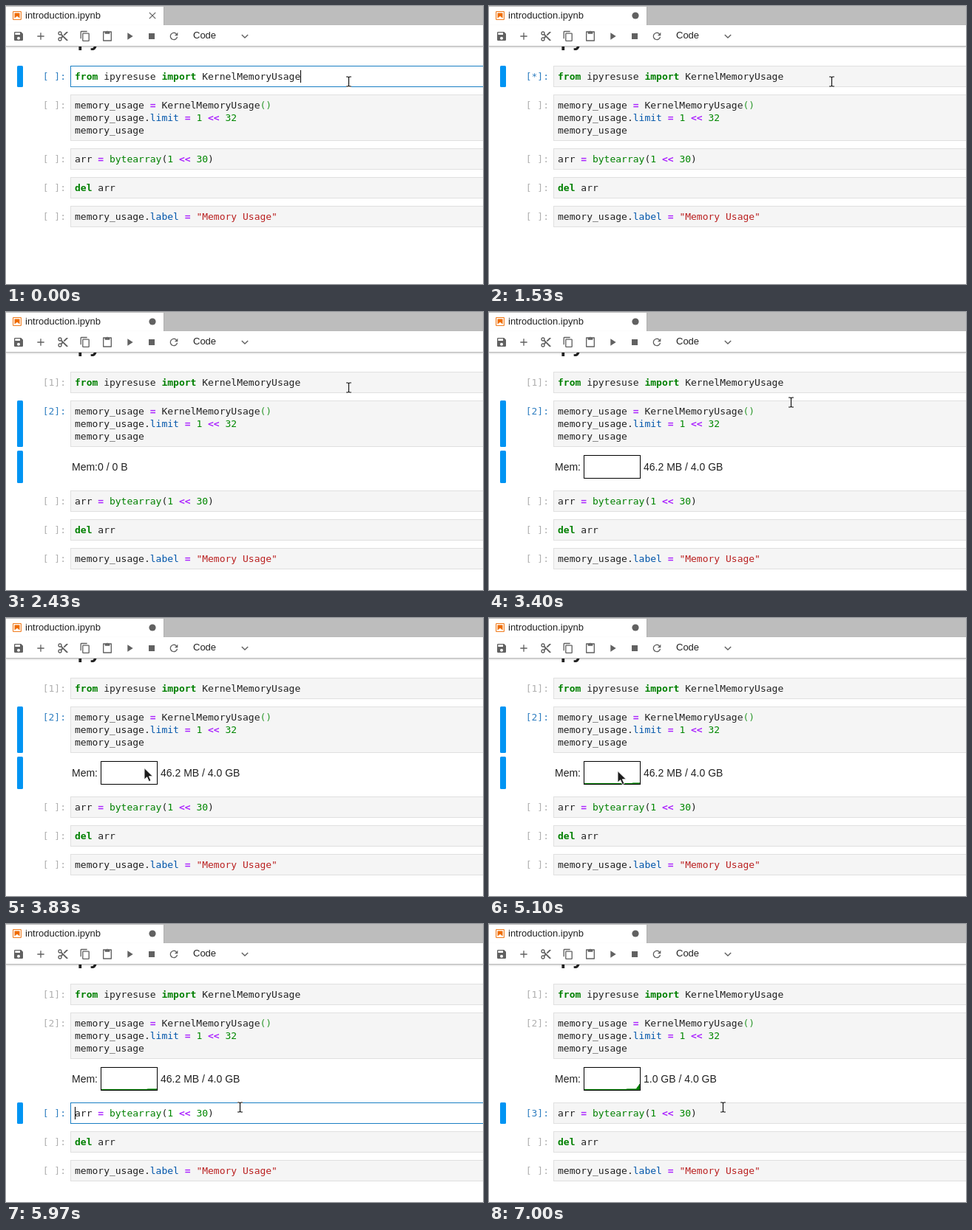
Write an HTML page that moves like this. It is 645 px wide and 377 px high and loops after 8000 ms.

```html
<!DOCTYPE html>
<html lang="en">
<head>
<meta charset="utf-8">
<title>Notebook memory usage</title>
<style>
  html, body { margin: 0; width: 100%; height: 100%; overflow: hidden; background: #fff; }
  #stage { position: relative; width: 645px; height: 377px; overflow: hidden; background: #fff; }
  #stage div, #stage svg { position: absolute; box-sizing: border-box; white-space: pre; }
  .ui { font: 13px/17px "Liberation Sans", Arial, sans-serif; color: #212121; }
  .out { font: 14px/20px "Liberation Sans", Arial, sans-serif; color: #212121; top: 12px; }
  .code, .prompt { font: 13px/17px "DejaVu Sans Mono", monospace; }
  #tabbar { left: 0; top: 0; width: 645px; height: 26px; background: #bdbdbd; }
  #tab { left: 0; top: 1px; width: 214px; height: 25px; background: #fff; border-right: 1px solid #b0b0b0; }
  #toolbar { left: 0; top: 26px; width: 645px; height: 29px; background: #fff;
    border-bottom: 1px solid #bdbdbd; box-shadow: 0 1px 2px rgba(0, 0, 0, .2); }
  #heading { left: 89px; top: 29px; font: bold 27.3px/31px "Liberation Sans", Arial, sans-serif; color: #212121; }
  .cell { left: 0; width: 700px; }
  .bar { left: 15px; top: 0; width: 8px; height: 100%; background: #0094f3; border-radius: 1.5px; }
  .prompt { left: 49.7px; top: 6px; color: #b0b0b0; }
  .active > .prompt { color: #307fc1; }
  .code { left: 87px; top: 0; width: 600px; height: 100%; padding: 5px; color: #212121;
    background: #f5f5f5; border: 1px solid #e0e0e0; }
  .edit > .code { background: #fff; border-color: #1a7fc4; }
  .caret { top: 6px; width: 1px; height: 17px; background: #000; }
  .code b { color: #008000; }
  .code i { font-style: normal; }
  .code .op { color: #aa22ff; font-weight: bold; }
  .code .num { color: #008800; }
  .code .fn { color: #008000; }
  .code .prop { color: #0055aa; }
  .code .str { color: #ba2121; }
  .code .match { color: #2f9a2f; }
  #output { left: 0; top: 188px; width: 645px; height: 44px; }
  #plot { left: 128px; top: 6px; width: 77px; height: 32px; border: 1px solid #000; background: #fff; }
  #plot svg { left: 0; top: 0; }
  #art, #mouse { left: 0; top: 0; }
</style>
</head>
<body>
<div id="stage">
  <div id="heading">ipyresuse</div>
  <div id="tabbar"></div>
  <div id="tab"></div>
  <div id="toolbar"></div>
  <div class="ui" style="left:26px;top:4px">introduction.ipynb</div>
  <div class="ui" style="left:253px;top:31px">Code</div>
  <svg id="art" width="645" height="60" fill="#616161">
    <g transform="translate(8 6) scale(.636)" fill="#ef6c00">
      <path d="M2.5 2.5h17v17h-17z" fill="none" stroke="#ef6c00" stroke-width="1.5"/>
      <path d="M16.5 16.5l-5.4-4.3-5.6 4.3v-11h11z"/>
    </g>
    <path id="close" d="M193.8 8.8l8.4 8.4m0-8.4l-8.4 8.4" stroke="#616161" stroke-width="1.2"/>
    <circle id="dirty" cx="198" cy="13" r="4.6"/>
    <path d="M318.8 39l4.2 4 4.2-4" fill="none" stroke="#616161" stroke-width="1.4"/>
  </svg>
  <div id="output">
    <div class="bar" id="outBar"></div>
    <div class="out" id="label" style="left:89px"></div>
    <div id="plot"><svg width="75" height="30"><path id="line" fill="#008000" stroke="#008000" stroke-width="1"/></svg></div>
    <div class="out" id="value" style="left:209px"></div>
  </div>
  <svg id="mouse" width="645" height="377">
    <g id="beam" fill="none">
      <path d="M-3.5-6.5h2.5l1 1 1-1h2.5M0-5.5v11M-3.5 6.5h2.5l1-1 1 1h2.5" stroke="#fff" stroke-width="2.6"/>
      <path d="M-3.5-6.5h2.5l1 1 1-1h2.5M0-5.5v11M-3.5 6.5h2.5l1-1 1 1h2.5" stroke="#111" stroke-width="1.2"/>
    </g>
    <path id="arrow" d="M0-.5v15.6l3.7-3.4 2.6 6 2.7-1.2-2.6-5.7h5.1z"
      fill="#1c1c1c" stroke="#fff" stroke-width=".9"/>
  </svg>
</div>
<script>
const LOOP = 8000;
const $ = id => document.getElementById(id);
const show = (el, on) => { el.style.display = on ? "" : "none"; };

// Toolbar icons on a 24 unit grid, 30 px apart
const ICONS = [
  '<path fill-rule="evenodd" d="M17 3H5a2 2 0 0 0-2 2v14a2 2 0 0 0 2 2h14a2 2 0 0 0 2-2V7zM12 19a3 3 0 0 1 0-6 3 3 0 0 1 0 6zM15 9H5V5h10z"/>',
  '<path d="M19 13h-6v6h-2v-6H5v-2h6V5h2v6h6z"/>',
  '<g fill="none" stroke="#616161" stroke-width="2"><circle cx="6" cy="6" r="3"/><circle cx="6" cy="18" r="3"/></g>' +
    '<path d="M9.6 7.6L22 20v1h-3l-7-7-2.4 2.4-2-2L10 12 7.6 9.6zM19 3l-6 6 2 2 7-7V3z"/>',
  '<path d="M3.3 17V3.5q0-1.2 1.2-1.2H16" fill="none" stroke="#616161" stroke-width="2"/>' +
    '<rect x="7.2" y="6.2" width="12.6" height="15.4" rx="1" fill="none" stroke="#616161" stroke-width="2"/>',
  '<path d="M4 3h16v18H4z" fill="none" stroke="#616161" stroke-width="2" stroke-linejoin="round"/>' +
    '<path fill-rule="evenodd" d="M7 7V3h2.2a3 3 0 0 1 5.6 0H17v4zM12 2a1 1 0 0 0 0 2 1 1 0 0 0 0-2z"/>',
  '<path d="M8 5v14l11-7z"/>',
  '<path d="M6 6h12v12H6z"/>',
  '<path d="M18.8 13.3A7 7 0 1 1 17 7.1" fill="none" stroke="#616161" stroke-width="2"/><path d="M20 4v6.7h-6.7z"/>'
];
$("art").insertAdjacentHTML("beforeend", ICONS.map((icon, i) =>
  `<g transform="translate(${9 + 30 * i} 33) scale(.6667)">${icon}</g>`).join(""));

const tag = (cls, text) => `<i class="${cls}">${text}</i>`;
const eq = tag("op", "=");
const shift = n => `${tag("num", 1)} ${tag("op", "&lt;&lt;")} ${tag("num", n)}`;
const SOURCES = [
  "<b>from</b> ipyresuse <b>import</b> KernelMemoryUsage",
  `memory_usage ${eq} KernelMemoryUsage${tag("match", "()")}\nmemory_usage.${tag("prop", "limit")} ${eq} ${shift(32)}\nmemory_usage`,
  `arr ${eq} ${tag("fn", "bytearray")}(${shift(30)})`,
  "<b>del</b> arr",
  `memory_usage.${tag("prop", "label")} ${eq} ${tag("str", '"Memory Usage"')}`
];
const CARET_X = [398, 93, 93, 93, 93];
const cells = SOURCES.map((html, i) => {
  const el = document.createElement("div");
  const height = 12 + 17 * html.split("\n").length;
  el.style.height = height + "px";
  el.innerHTML = `<div class="bar"></div><div class="prompt"></div><div class="code">${html}</div>` +
    `<div class="caret" style="left:${CARET_X[i]}px"></div>`;
  $("stage").insertBefore(el, $("output"));
  const [bar, prompt, , caret] = el.children;
  return { el, bar, prompt, caret, height };
});

// Latest entry of a [time, value] table
const at = (steps, t) => steps.reduce((v, s) => (t >= s[0] ? s[1] : v), steps[0][1]);

const SELECTED = [[0, 0], [2070, 1], [5965, 2]];
const EDITING = [[0, 0], [1530, -1], [5965, 2], [6400, -1]];
const CARET = [[0, true], [430, false], [1000, true]];
const COUNTS = [
  [[0, " "], [1530, "*"], [1570, "1"]],
  [[0, " "], [2370, "*"], [2430, "2"]],
  [[0, " "], [6400, "*"], [6970, "3"]],
  [[0, " "]],
  [[0, " "]]
];
// Where the raised part of the graph begins
const RAISED = [[0, 75], [4430, 64], [5700, 61], [7000, 56]];

const easeOut = p => 1 - (1 - p) ** 3;
const easeBoth = p => p * p * (3 - 2 * p);
const MOVES = [
  { from: 3367, to: 3567, x: 242, y: 184, ease: p => p * (1.6 - .6 * p) },
  { from: 3733, to: 3967, x: 174, y: 208, ease: easeOut },
  { from: 5367, to: 5933, x: 316, y: 249, ease: easeBoth }
];

function mouseAt(t) {
  const time = Math.floor((t + 5) * .03) / .03;
  let x = 463, y = 103;
  for (const m of MOVES) {
    const p = m.ease(Math.min(1, Math.max(0, (time - m.from) / (m.to - m.from))));
    x += (m.x - x) * p;
    y += (m.y - y) * p;
  }
  return { x: Math.round(x), y: Math.round(y) };
}

function drawGraph(t) {
  show($("line"), t >= 4200);
  const r = at(RAISED, t);
  const end = t >= 7000 ? "L70 28.9L75 22" : "L75 28.9";
  const body = r < 75 ? `L${r} 29.4L${r + 2} 28.9${end}` : "L75 29.4";
  $("line").setAttribute("d", `M0 29.4${body}V30H0z`);
}

function render(t) {
  const selected = at(SELECTED, t), editing = at(EDITING, t);
  const hasOutput = t >= 2430, hasPlot = t >= 2470;
  let top = 81;
  cells.forEach((c, i) => {
    c.el.style.top = top + "px";
    c.el.className = "cell" + (i === selected ? " active" : "") + (i === editing ? " edit" : "");
    show(c.bar, i === selected);
    show(c.caret, i === editing && at(CARET, t));
    c.prompt.textContent = `[${at(COUNTS[i], t)}]:`;
    top += c.height + (i === 0 || i > 1 || !hasOutput ? 10 : 59);
  });

  show($("close"), t < 1530);
  show($("dirty"), t >= 1530);
  show($("output"), hasOutput);
  show($("outBar"), selected === 1);
  show($("plot"), hasPlot);
  $("label").textContent = hasPlot ? "Mem:" : "Mem:0 / 0 B";
  $("value").textContent = !hasPlot ? "" : t < 7000 ? "46.2 MB / 4.0 GB" : "1.0 GB / 4.0 GB";
  drawGraph(t);

  const { x, y } = mouseAt(t);
  const overCode = y <= 184 || y >= 242;
  show($("beam"), overCode);
  show($("arrow"), !overCode);
  $(overCode ? "beam" : "arrow").setAttribute("transform",
    overCode ? `translate(${x + .5} ${y - .5})` : `translate(${x} ${y})`);
}

const start = performance.now();
function tick() {
  render((performance.now() - start) % LOOP);
  requestAnimationFrame(tick);
}
tick();
</script>
</body>
</html>
```
